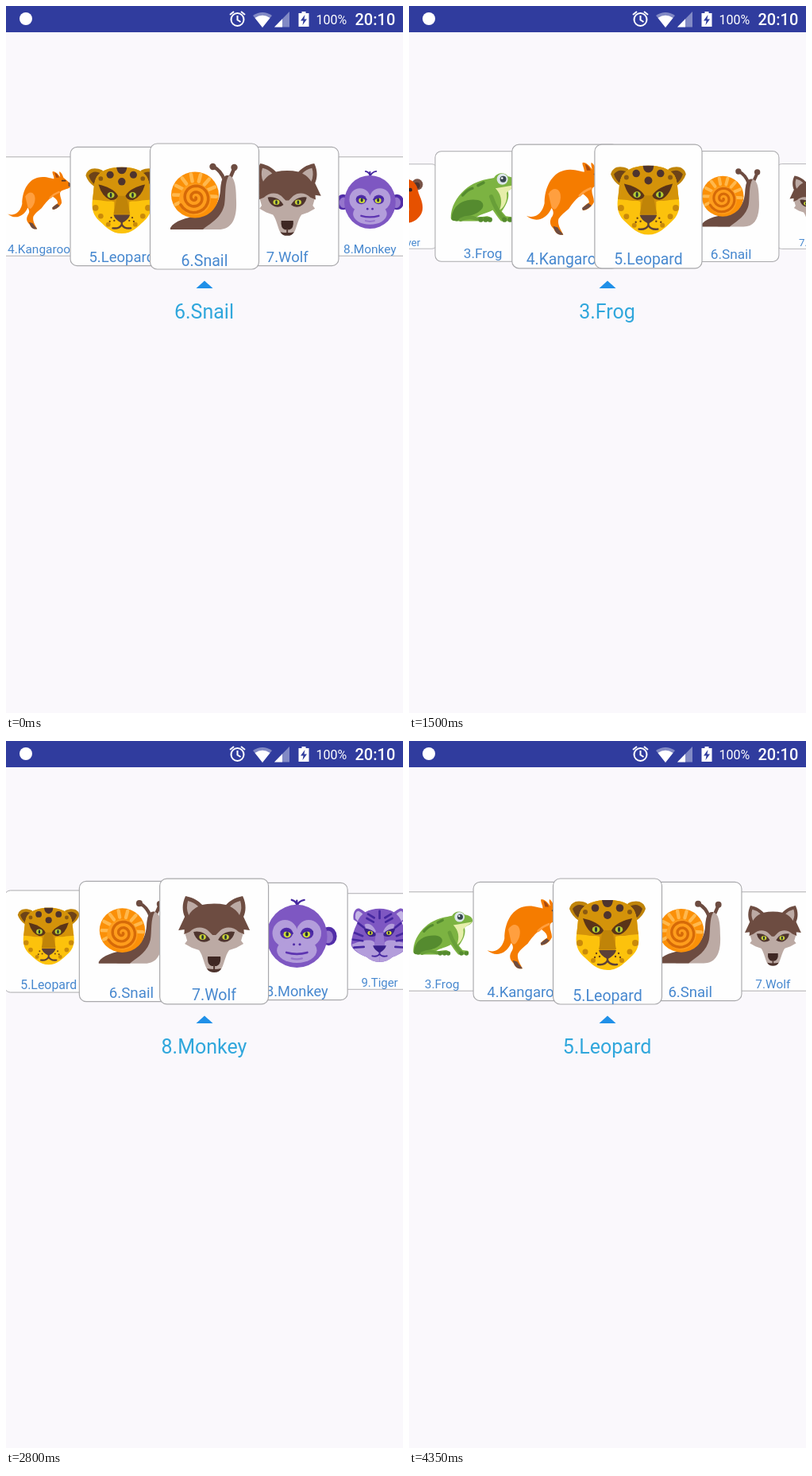
An HTML page for the animation above (4400 ms loop, 500 by 889 pixels).

```html
<!DOCTYPE html>
<html lang="en">
<head>
<meta charset="utf-8">
<title>Animal carousel</title>
<style>
html, body { margin: 0; width: 100%; height: 100%; overflow: hidden; background: #faf8fc; }
svg { display: block; width: 100vw; height: 100vh; font-family: Roboto, "Noto Sans", sans-serif; }
</style>
</head>
<body>
<svg id="stage" viewBox="0 0 500 889">
  <rect width="500" height="889" fill="#faf8fc"/>
  <g id="cards"></g>
  <path d="M239.5 355Q245 350 250 345.5Q255 350 260.5 355Z" fill="#2090e8"/>
  <text id="title" x="249.500" y="393" text-anchor="middle" font-size="25" fill="#30a7dc"></text>
  <circle id="touch" cy="322" r="15.500" fill="#fff" fill-opacity=".25" stroke="#9aa4c8" stroke-opacity=".4" stroke-width="1.500"/>
  <rect width="500" height="33" fill="#303c9e"/>
  <g fill="#fff">
    <circle cx="25" cy="16" r="8"/>
    <g fill="none" stroke="#fff" stroke-width="2">
      <circle cx="291.500" cy="17" r="8"/>
      <path d="M291.500 12V17.500L295.500 20M282 11L287 7M301 11L296 7"/>
    </g>
    <path d="M323 27L311 12Q323 4 335 12Z" opacity=".4"/>
    <path d="M323 27L313.500 15Q323 8.500 332.500 15Z"/>
    <path d="M338 26.500H357V7Z" opacity=".4"/>
    <path d="M338 26.500H348V16.300Z"/>
    <path d="M372.500 7H377.500V9H381.500V26H368.500V9H372.500Z"/>
    <path d="M376.500 11L371 18.500H374.500L373.500 24L379 16.500H375.500Z" fill="#303c9e"/>
    <text x="390.500" y="23" font-size="16">100%</text>
    <text x="439.500" y="24" font-size="20" font-weight="500">20:10</text>
  </g>
</svg>
<script>
const LOOP = 4400, STEP = 50, GAP = 104.2, BEND = 0.332;

const path = (d, fill) => `<path d="${d}" fill="${fill}"/>`;
const line = (d, color, w = 2) =>
  `<path d="${d}" fill="none" stroke="${color}" stroke-width="${w}" stroke-linecap="round" stroke-linejoin="round"/>`;
const oval = (x, y, rx, fill, ry = rx) => `<ellipse cx="${x}" cy="${y}" rx="${rx}" ry="${ry}" fill="${fill}"/>`;
const mirror = s => s + `<g transform="translate(500) scale(-1 1)">${s}</g>`;
const move = (t, s) => `<g transform="${t}">${s}</g>`;

function alligator() {
  let teeth = "";
  for (let i = 0; i < 6; i++) {
    const x = 45 + i * 4.4, y = 248 - i * 4.3;
    teeth += path(`M${x} ${y}l4 -4l1 7z`, "#ffe9c4");
    teeth += path(`M${x + 2} ${257 - i * 2.5}l4 -2.200l0 -6z`, "#ffe9c4");
  }
  return move("translate(250 252) scale(1.270) translate(-42 -252)",
    path("M27 264L42 248L49 250L42 260Z", "#e53945") + teeth +
    path("M22 272C28 265 34 263 40 260L76 241C79 249 73 256 68 261C60 269 52 274 46 277H25Z", "#26a69a") +
    line("M34 262L46 256L56 251", "#e53945", 3) +
    path("M10 277V250C10 236 16 229 24 229C32 228 41 228 46 222C52 216 57 211 64 211C72 210 71 219 68 224C60 231 52 240 43 250C39 257 31 260 28 263Q28 268 20 271Q12 273 10 277Z", "#00796b") +
    path("M16 239Q24 227 35 236Q33 246 20 247Z", "#004d40") +
    oval(26, 239, 5, "#fdd835") + oval(26, 239, 1.4, "#263238", 4) + oval(63, 216, 2, "#004d40") +
    line("M13 259Q18 262 22 258", "#26a69a", 2.5));
}

function beaver() {
  return mirror(oval(218, 211, 10.5, "#795548") + oval(219, 213, 6, "#4e342e")) +
    path("M250 199C269 199 280 206 283 221C285 232 292 240 292 254C292 266 286 271 281 276C273 282 264 284 250 284C236 284 227 282 219 276C214 271 208 266 208 254C208 240 215 232 217 221C220 206 231 199 250 199Z", "#e65100") +
    path("M237 262H263L260 276H240Z", "#7a3213") +
    mirror(oval(231, 221, 3.5, "#3e2723") +
      path("M250 236C240 233 233 248 233 258C234 268 244 270 250 265Z", "#c9803f") +
      path("M241 236C236 242 233 251 233 259C235 267 241 268 243 262Q239 250 241 236Z", "#ff9d45")) +
    path("M242.500 264H257.500V281H242.500Z", "#fff") + line("M250 265V280", "#d7ccc8", 1) +
    line("M250 241V264", "#7a3f1c", 1.5) +
    path("M239 229C241 222 259 222 261 229C262 235 255 242 250 242C245 242 238 235 239 229Z", "#5d4037");
}

function frog() {
  return path("M204 268C204 250 216 232 232 222C246 214 256 213 266 211C270 203 282 202 286 209C294 210 299 214 299 219C298 225 290 226 286 230C289 241 282 252 277 259L283 266L291 267C294 269 293 274 288 273L276 273C270 266 267 261 264 257C257 262 247 262 240 268L256 266C262 267 262 274 256 273H212C206 273 204 271 204 268Z", "#7cb342") +
    path("M268 226L298 221C293 226 287 228 284 233C286 244 280 254 274 257C278 246 277 235 268 226Z", "#e6eeaa") +
    path("M205 268C207 248 226 240 243 243C254 246 253 257 238 263C227 267 220 268 213 273C207 273 204 271 205 268Z", "#558b2f") +
    line("M218 271Q230 265 241 270L258 269", "#689f38", 5) +
    line("M262 238Q268 256 280 270", "#689f38", 6) +
    [247, 254, 260, 281, 289].map(x => oval(x, 271, 3.5, "#558b2f")).join("") +
    line("M221 236Q228 228 235 226M243 222L251 218", "#558b2f", 4) +
    oval(278, 213, 8, "#dce6ea") + oval(279, 213, 4.5, "#37474f") + oval(277.5, 211.5, 1.5, "#fff");
}

function kangaroo() {
  return move("translate(-2 0)",
    path("M202 264C212 268 222 262 225 248C225 228 234 210 250 206C262 203 272 208 276 208C276 203 272 198 274 196C279 196 283 201 286 205C285 201 284 198 285 196C289 199 290 203 291 206L303 216C305 220 301 223 296 224C291 226 288 226 286 229C284 235 289 241 288 247C285 253 279 257 274 257C272 254 276 251 282 247C282 242 278 239 274 236C266 241 260 249 256 255C250 260 246 263 243 268C241 275 246 282 249 288C243 289 239 286 237 281C232 276 231 272 234 266C237 262 237 258 234 254C228 268 214 274 202 264Z", "#f57c00") +
    path("M230 236C238 223 250 232 244 248C240 256 238 258 234 253Z", "#ff9f3f") +
    line("M284 229Q276 232 270 238", "#ff9f3f", 3) +
    path("M236 277L242 279C244 283 248 286 249 288C243 289 239 287 236 277Z", "#6d4c41") +
    path("M273 254L281 248L285 251Q279 257 274 257Z", "#6d4c41") +
    path("M277 198Q282 200 284 206L279 206Z", "#a84a10") +
    path("M299 213L304 217Q304 221 299 220Z", "#6d4c41") + line("M289 211H294", "#4e342e", 2.2));
}

function leopard() {
  const dots = (color, list) => list.map(([x, y, r]) => oval(x, y, r, color)).join("");
  return mirror(path("M202 211C204 202 213 199 224 204L230 212L214 226Q205 220 202 211Z", "#c08408") +
      path("M206 211Q212 203 222 208L214 223Q208 218 206 211Z", "#6d4318")) +
    path("M250 200C264 200 276 203 283 212C288 220 287 232 289 243C291 258 286 266 279 272C271 279 264 288 250 288C236 288 229 279 221 272C214 266 209 258 211 243C213 232 212 220 217 212C224 203 236 200 250 200Z", "#fcc20c") +
    path("M250 200C264 200 276 203 283 212C288 220 287 232 289 243L277 244C270 246 264 244 260 246L260 265H240L240 246C236 244 230 246 223 244L211 243C213 232 212 220 217 212C224 203 236 200 250 200Z", "#d4930a") +
    path("M244 238H256L261 262H239Z", "#c08408") +
    mirror(path("M219 223C229 225 241 230 245 238Q243 244 235 243.500Q224 240 219 223Z", "#5a3418") +
      oval(235.5, 237, 4.8, "#b5cc33", 4) + oval(235.5, 237, 1.5, "#263238", 3.2) +
      oval(234.5, 210, 4.8, "#4e342e") + oval(222, 215, 3, "#8a5a12") +
      dots("#c98a0a", [[215, 254, 4], [222, 265, 3.5], [232, 276, 3]]) +
      dots("#6d4318", [[236, 267, 1.2], [240, 271, 1.2], [234, 272, 1.2]])) +
    path("M243 200H257Q256 209 250 209Q244 209 243 200Z", "#4e342e") + oval(250, 219, 5, "#4e342e") +
    path("M239 263H261Q259 270 250 274Q241 270 239 263Z", "#5d4037") +
    line("M250 272V276Q247 282 238 281M250 276Q253 282 262 281", "#5d4037", 2.5);
}

function snail() {
  let rays = "", spiral = "";
  for (let i = 0; i < 9; i++) {
    const a = Math.PI * (0.86 + i * 0.145), c = Math.cos(a), s = Math.sin(a);
    rays += line(`M${238 + 18 * c} ${238 + 18 * s}L${238 + 27 * c} ${238 + 27 * s}`, "#ffb84d", 4.5);
  }
  for (let a = 0; a < 15.5; a += 0.25) {
    const r = 1 + a * 1.25;
    spiral += `${a ? "L" : "M"}${(238 + r * Math.cos(a)).toFixed(1)} ${(241 + r * Math.sin(a)).toFixed(1)}`;
  }
  return line("M275 219Q271 207 261 202M281 219L288 203", "#6d4c41", 4.5) +
    oval(260.5, 202, 4.2, "#6d4c41") + oval(287.5, 203, 4.2, "#6d4c41") +
    path("M230 281C256 274 268 262 270 238C270 222 272 213 279 213C288 213 290 226 290 245C291 268 284 281 268 281Z", "#bcaaa4") +
    path("M207 281V279C212 270 228 266 240 264C259 260 268 252 270 232C271 220 272 212 281 213C275 221 277 240 275 250C271 268 254 275 248 281Z", "#6d4c41") +
    oval(238, 237.5, 30, "#fb9008", 29) + rays + oval(238, 243, 20, "#ff9d1c") + line(spiral, "#d66a08", 3.6);
}

function wolf() {
  return path("M211 234L289 234L284 251L287 255L278 260L269 263C264 269 262 284 258 288Q250 292 242 288C238 284 236 269 231 263L222 260L213 255L216 251Z", "#bcaaa4") +
    path("M214 195C225 197 231 202 235 206Q250 203 265 206C269 202 275 197 286 195C291 205 290 215 287 221L295 238L287 237L288 243L281 240C274 233 264 233 258 238L252 244H248L242 238C236 233 226 233 219 240L212 243L213 237L205 238L213 221C210 215 209 205 214 195Z", "#6d4c41") +
    mirror(path("M217 201Q225 203 230 208Q222 212 218 219Q214 210 217 201Z", "#bcaaa4") +
      path("M224 240C232 238 241 242 245 250Q240 254 233 252Q226 249 224 240Z", "#4e342e") +
      oval(235.5, 246.5, 4.3, "#c6cf36", 3.5) + oval(235.5, 246.5, 1.4, "#263238", 2.8)) +
    path("M242 271H258Q259 281 253 283H247Q241 281 242 271Z", "#3e2723") +
    path("M241 286Q250 288 259 286Q257 291 250 291Q243 291 241 286Z", "#4e342e") + line("M250 282V287", "#4e342e", 2);
}

function monkey() {
  return line("M250 204Q250 198 243 196M250 204Q253 197 260 196M250 204V197", "#4527a0", 2.5) +
    mirror(oval(207, 245, 11, "#512da8", 12.5) + oval(208, 246, 7, "#9575cd", 8.5)) +
    oval(250, 245, 41, "#7e57c2", 42.5) +
    mirror(oval(234, 241, 17, "#b39ddb", 18)) + oval(250, 264, 27, "#b39ddb", 17) +
    path("M236 236H264V262H236Z", "#b39ddb") +
    mirror(oval(236, 241, 8.5, "#512da8", 7.5) + oval(237, 242.5, 5, "#cddc39", 4.5) + oval(237, 242, 2, "#263238", 3) +
      line("M229 239Q236 235 244 241", "#4527a0", 2.5) + oval(246, 256, 1.7, "#512da8")) +
    line("M236 267Q250 271 264 267", "#5e35b1", 3) + line("M243 275Q250 277 257 275", "#9575cd", 2.5);
}

function tiger() {
  return mirror(path("M207 216C205 204 211 196 217 198Q226 202 231 209L214 221Z", "#7e57c2") +
      path("M210 214Q209 203 215 202Q222 205 224 210L214 219Z", "#c5b5e6")) +
    path("M250 198C268 198 283 206 287 222C293 234 296 245 297 257C296 266 282 274 271 278Q263 286 250 286Q237 286 229 278C218 274 204 266 203 257C204 245 207 234 213 222C217 206 232 198 250 198Z", "#7e57c2") +
    mirror(path("M204 257C215 252 232 247 240 252L250 264V286Q237 286 229 278C218 274 207 267 204 257Z", "#b39ddb") +
      path("M225 224C233 220 241 227 244 236L238 241Q228 235 225 224Z", "#b39ddb") +
      line("M209 238L222 243M206 249L222 251M208 262L224 261M215 222L224 229M231 207L241 213M229 214L240 220", "#4527a0", 3.5) +
      path("M224 230C233 231 242 235 245 242Q239 246 232 243Q226 239 224 230Z", "#39208a") +
      oval(234.5, 238, 4.2, "#d4d831", 3.5) + oval(235, 238, 1.4, "#263238", 2.8)) +
    line("M250 202V214", "#4527a0", 3.5) +
    path("M244 238H256L259 260H241Z", "#9575cd") +
    path("M239 259H261Q259 266 250 271Q241 266 239 259Z", "#39208a") +
    line("M250 270V273Q246 278 238 276M250 273Q254 278 262 276", "#4527a0", 2.5);
}

const names = ["Alligator", "Beaver", "Frog", "Kangaroo", "Leopard", "Snail", "Wolf", "Monkey", "Tiger"];
const art = [alligator, beaver, frog, kangaroo, leopard, snail, wolf, monkey, tiger];
const label = n => `${n}.${names[n - 1]}`;

const layer = document.getElementById("cards");
const title = document.getElementById("title");
const touch = document.getElementById("touch");

const cards = art.map((draw, i) => {
  const el = document.createElementNS("http://www.w3.org/2000/svg", "g");
  el.innerHTML = `<rect x="181.500" y="173" width="137" height="158" rx="9" fill="#fefefe" stroke="#a9a9ac" stroke-width="1.200"/>` +
    draw() + `<text x="250" y="326.500" text-anchor="middle" font-size="19.600" fill="#4788cf">${label(i + 1)}</text>`;
  return { el, n: i + 1 };
});

// time in ms, card number at the centre
const track = [
  [0, 6], [150, 6], [250, 5.75], [350, 5.05], [500, 3.98], [650, 3.45], [850, 3.12], [1000, 3.03],
  [1150, 2.996], [1250, 3], [1400, 3.6], [1600, 5.55], [1800, 7.034], [1950, 7.55], [2100, 7.85],
  [2250, 7.97], [2400, 8], [2600, 8], [2700, 7.7], [2850, 6.4], [2950, 5.5], [3100, 4.732],
  [3250, 4.62], [3450, 4.78], [3600, 4.95], [3750, 5], [4400, 5]
];
const titles = [[0, 6], [950, 3], [2100, 8], [3450, 5]];

const slope = i => (track[i + 1][1] - track[i][1]) / (track[i + 1][0] - track[i][0]);
function tangent(i) {
  if (i === 0 || i === track.length - 1) return 0;
  const a = slope(i - 1), b = slope(i);
  return a * b > 0 ? 2 * a * b / (a + b) : 0;
}

// monotone cubic through the track points
function centre(t) {
  let i = 0;
  while (t >= track[i + 1][0]) i++;
  const [t0, a] = track[i], [t1, b] = track[i + 1];
  const h = t1 - t0, u = (t - t0) / h, v = 1 - u;
  return a * v * v * (1 + 2 * u) + b * u * u * (3 - 2 * u) + h * u * v * (v * tangent(i) - u * tangent(i + 1));
}

function render(t) {
  const p = centre(t);
  cards.sort((a, b) => Math.abs(b.n - p) - Math.abs(a.n - p));
  for (const { el, n } of cards) {
    const d = n - p, shown = Math.abs(d) < 3.6;
    el.style.display = shown ? "" : "none";
    if (shown) el.setAttribute("transform", `translate(${250 + d * GAP} 252) scale(${Math.cos(d * BEND)}) translate(-250 -252)`);
    layer.appendChild(el);
  }
  title.textContent = label(titles.filter(s => s[0] <= t).pop()[1]);
  touch.style.display = t >= 250 && t <= 500 ? "" : "none";
  touch.setAttribute("cx", 217 - (p - 3.98) * GAP);
}

const start = performance.now();
let last = -1;
function tick() {
  const t = Math.floor((performance.now() - start) % LOOP / STEP) * STEP;
  if (t !== last) render(last = t);
  requestAnimationFrame(tick);
}
tick();
</script>
</body>
</html>
```
